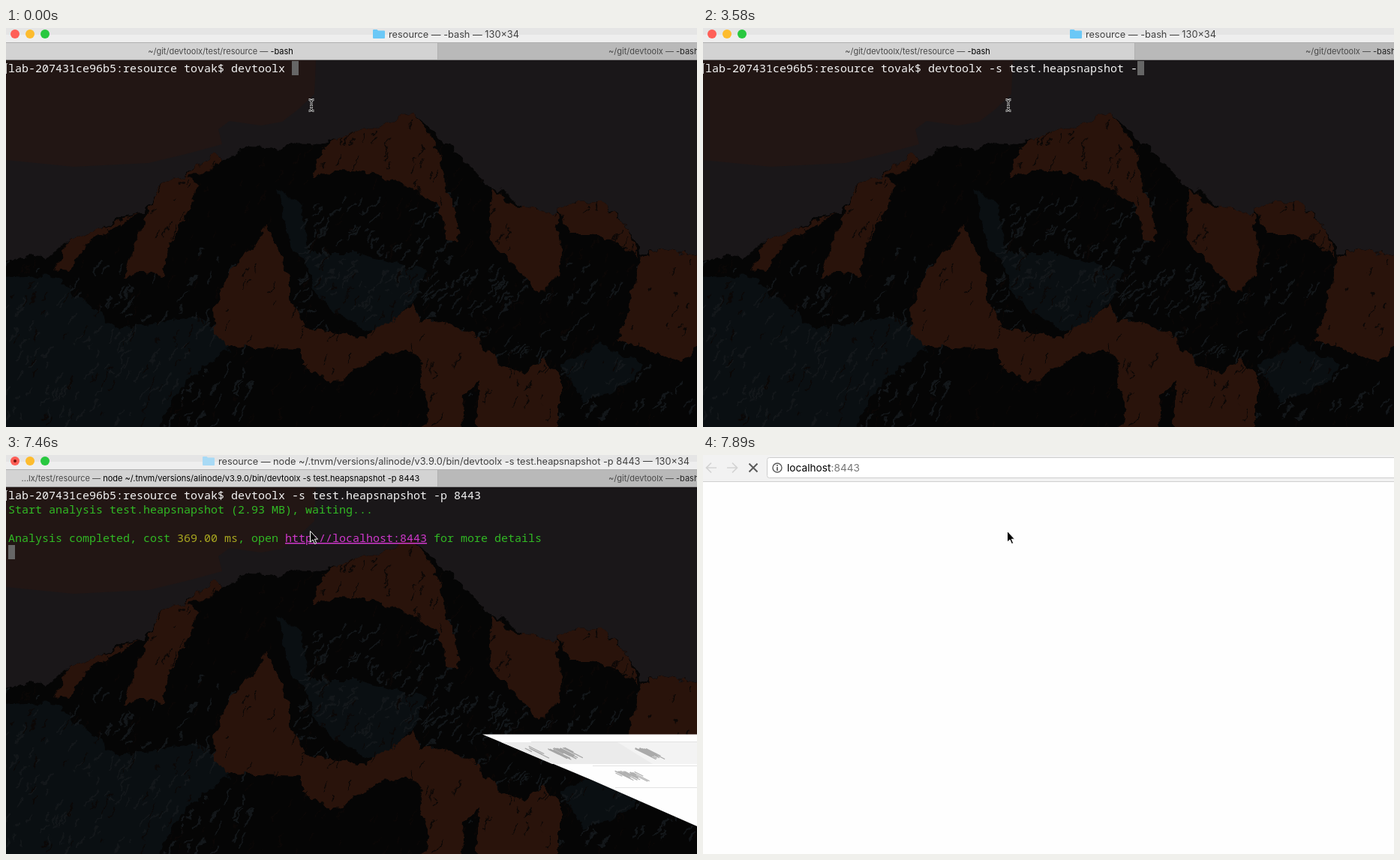
An HTML page for the animation above (8 s loop, 921 px wide and 532 px high).

```html
<!DOCTYPE html>
<html lang="en">
<head>
<meta charset="utf-8">
<title>Terminal session</title>
<style>
  html, body { margin: 0; width: 100%; height: 100%; overflow: hidden; background: #000; }
  svg { display: block; width: 921px; height: 532px; }
  text { white-space: pre; font-family: Inter, sans-serif; }
  .mono text { font: 500 15px "Noto Sans Mono", monospace; fill: #f4f4f4; }
  .mono .green { fill: #31b924; }
  .yellow { fill: #aaa820; }
  .link { fill: #d038cc; text-decoration: underline; }
  .tab { font-size: 11px; fill: #484848; }
  .bold { fill: #000; }
</style>
</head>
<body>
<svg viewBox="0 0 921 532">
  <defs>
    <filter id="rough" filterUnits="userSpaceOnUse" x="0" y="0" width="921" height="532" color-interpolation-filters="sRGB">
      <feTurbulence type="fractalNoise" baseFrequency=".07" numOctaves="3" seed="4"/>
      <feDisplacementMap in="SourceGraphic" scale="15" xChannelSelector="R" yChannelSelector="G"/>
    </filter>
    <path id="ridge" d="M-20 318L8 310 35 303 60 305 85 283 122 270 150 255 185 245 200 220 212 206 238 197 278 168 290 178 322 158 370 160 385 153 420 155 440 147 490 132 510 127 528 115 545 113 556 125 600 165 645 212 658 217 688 238 712 243 725 250 735 240 752 234 795 233 812 248 830 268 846 302 870 294 940 307V550H-20Z"/>
    <clipPath id="rock"><use href="#ridge"/></clipPath>
    <clipPath id="edge"><path id="edgePath"/></clipPath>
  </defs>

  <!-- wallpaper -->
  <rect width="921" height="532" fill="#1a1719"/>
  <path fill="#221614" d="M0 43H413L411 88 390 108 368 125 340 130 298 124 283 135 288 155 240 168 190 180 90 185 40 180 0 176Z"/>
  <g filter="url(#rough)">
    <use href="#ridge" fill="#050505"/>
    <g clip-path="url(#rock)">
      <g fill="#0a0f12">
        <path d="M400 300L470 300 560 325 545 365 490 408 450 388 410 350Z"/>
        <path d="M-20 335L60 330 150 400 260 385 300 425 240 470 190 550H-20Z"/>
        <path d="M360 215L395 235 405 320 380 290Z"/>
        <path d="M740 450L790 420 850 450 830 475 770 500Z"/>
      </g>
      <path id="snow" stroke="#13171a" stroke-width="2.4"/>
      <g fill="#29130b">
        <path d="M62 322L85 283 180 247 110 285 85 324Z"/>
        <path d="M160 330L172 285 200 220 212 204 240 195 253 208 250 235 220 285 208 330 190 325Z"/>
        <path d="M240 197L278 167 289 178 255 195Z"/>
        <path d="M406 200L425 160 440 146 490 131 528 114 545 112 580 170 585 215 598 240 604 285 590 282 575 240 550 217 520 205 480 192 440 190Z"/>
        <path d="M348 262L363 300 378 335 378 360 400 400 478 412 545 368 550 395 580 390 625 410 655 445 690 460 715 440 738 465V550H625L632 470 610 490 605 550H555L565 500 550 470 555 450 540 430 500 435 435 475 395 450 395 428 300 425 280 410 278 375 295 330 325 295Z"/>
        <path d="M650 215L672 235 735 245 740 300 735 330 710 355 690 330 650 290 645 250Z"/>
        <path d="M735 240L752 233 795 232 830 268 842 307 812 285 780 275 750 275Z"/>
        <path d="M846 305L870 294 940 307V410L900 445 815 415 830 375Z"/>
      </g>
      <path id="cracks" stroke="#0b0706" stroke-width="1.5"/>
    </g>
  </g>

  <!-- terminal window -->
  <rect width="921" height="20" fill="#eeeeee"/>
  <rect width="921" height="9" fill="#e5e5e5"/>
  <rect y="19" width="921" height="24" fill="#b9b9b9"/>
  <rect y="20" width="575" height="22" fill="#d3d3d3"/>
  <path d="M0 19.5H921M575.5 20V42" stroke="#b0b0b0"/>
  <path d="M0 42.5H921" stroke="#8f8f8f"/>
  <circle cx="12" cy="8" r="6" fill="#ff5f57"/>
  <circle id="busyDot" cx="12" cy="8" r="2" fill="#74110b"/>
  <circle cx="32" cy="8" r="6" fill="#fdbc2e"/>
  <circle cx="52" cy="8" r="6" fill="#28c83f"/>
  <path id="folder" d="M0 3Q0 2 1 2H5.500L7 3.500H15Q16 3.500 16 4.500V13Q16 14 15 14H1Q0 14 0 13Z"/>
  <text id="title" x="597" y="13" font-size="12.75" text-anchor="middle" fill="#404040"></text>
  <text class="tab" x="286" y="35" text-anchor="middle"><tspan id="tabPath"></tspan><tspan id="tabJob" class="bold"></tspan></text>
  <text class="tab" x="803" y="35">~/git/devtoolx — <tspan fill="#222">-bash</tspan></text>

  <g class="mono">
    <path d="M2 47.500H.5V61" stroke="#c8c8c8" fill="none"/>
    <text id="command" x="3" y="59"></text>
    <text id="start" class="green" x="3" y="78">Start analysis test.heapsnapshot (2.93 MB), waiting...</text>
    <text id="done" class="green" x="3" y="116">Analysis completed, cost <tspan class="yellow">369.00 ms</tspan>, open <tspan class="link">http://localhost:8443</tspan> for more details</text>
    <rect id="caret" width="9" height="19" fill="#666"/>
  </g>

  <!-- browser window sliding out of the dock -->
  <g id="sliver">
    <path d="M635 372.500H921V495L780 433Z" fill="#fefefe"/>
    <path d="M660 383H921V412H728Z" fill="#ebebeb"/>
    <path d="M815 383H921V412H862Z" fill="#f3f3f3"/>
    <path d="M700 382.500H921M782 414.500H921M812 443.500H921" stroke="#e2e2e2"/>
    <path id="smears" stroke="#333" stroke-opacity=".38" stroke-width="1.200"/>
  </g>
  <g id="browser" clip-path="url(#edge)">
    <g id="page">
      <rect x="-60" y="-30" width="1100" height="700" fill="#fefefe"/>
      <rect x="-60" y="-1" width="1100" height="36" fill="#f2f2f2"/>
      <path d="M66 -30H293V-2H66ZM534 -9H561V-7H534Z" fill="#ececec"/>
      <path d="M66 -9V-1.500H293L296 -9M526 -9L531 -1.500H1040M-60 35.500H1040" fill="none" stroke="#cfcfcf"/>
      <rect x="85.500" y="3.500" width="1000" height="27" rx="3" fill="#fff" stroke="#cdcdcd"/>
      <g fill="none" stroke-width="1.700">
        <path d="M18 17H5M11 10.500L4.500 17 11 23.500M32 17H45M39 10.500L45.500 17 39 23.500" stroke="#d3d3d3"/>
        <path d="M61.500 11.500L72.500 22.500M72.500 11.500L61.500 22.500" stroke="#5a5a5a" stroke-width="2"/>
        <path d="M99 16V21M99 13V14.700" stroke="#5a5a5a"/>
        <circle cx="99" cy="17" r="6" stroke="#5a5a5a" stroke-width="1.400"/>
      </g>
      <text x="112" y="22" font-size="13.700">localhost<tspan fill="#777">:8443</tspan></text>
    </g>
  </g>

  <!-- pointers -->
  <g id="beam" fill="none">
    <path id="beamShape" d="M403.500 95.500Q407 95.500 407 98.500V107.500Q407 110.500 403.500 110.500M410.500 95.500Q407 95.500 407 98.500M407 107.500Q407 110.500 410.500 110.500M405 104.500H409" stroke="#d0d0d0" stroke-width="2.800"/>
    <use href="#beamShape" style="stroke:#111"/>
    <path d="M403.500 95.500Q407 95.500 407 98.500V107.500Q407 110.500 403.500 110.500M410.500 95.500Q407 95.500 407 98.500M407 107.500Q407 110.500 410.500 110.500M405 104.500H409" stroke="#111"/>
  </g>
  <path id="arrow" d="M405.500 101.500V116L409 113 411.500 118.500 413.700 117.500 411.300 112.200H415.500Z" fill="#000" stroke="#fff"/>
</svg>
<script>
const el = id => document.getElementById(id);
const show = (id, on) => el(id).style.display = on ? "" : "none";
const setText = (id, s) => el(id).textContent = s;

let seed = 11;
const rand = () => (seed = seed * 16807 % 2147483647) / 2147483647;

// Slanted strokes scattered over a box
function streaks(count, x, y, w, h, length, lean) {
  let d = "";
  for (let i = 0; i < count; i++) {
    const run = length * (.4 + rand());
    d += `M${x + rand() * w} ${y + rand() * h}l${lean * run} ${run}`;
  }
  return d;
}
el("snow").setAttribute("d", streaks(170, 0, 290, 330, 240, 14, -.6) +
  streaks(130, 390, 220, 220, 180, 10, -1) + streaks(130, 600, 300, 320, 220, 14, -.8));
el("cracks").setAttribute("d", streaks(480, 0, 120, 921, 412, 12, -.45));
el("smears").setAttribute("d", streaks(22, 722, 390, 25, 3, 10, 2) +
  streaks(16, 838, 390, 16, 3, 10, 2) + streaks(20, 810, 421, 30, 4, 9, 2) +
  streaks(4, 690, 388, 14, 4, 9, 2));
el("beam").children[1].remove();

const prompt = "lab-207431ce96b5:resource tovak$ devtoolx ";
const keys = [[600, "-"], [750, "s"], [1190, " "], [1640, "t"], [2240, "e"],
  [2530, "st.heapsnapshot "], [3580, "-"], [3880, "p"], [4330, " "],
  [5080, "8"], [5520, "4"], [5820, "4"], [6120, "3"]];
const ENTER = 6860, RUN = 7010, DONE = 7310, SLIVER = 7460, SWEEP = 7600, SETTLE = 7750, OPEN = 7890;
const job = "node ~/.tnvm/versions/alinode/v3.9.0/bin/devtoolx -s test.heapsnapshot -p 8443";

// Left edge of the window and its shear while it unfolds
const poses = {
  [SWEEP]: ["M0 0Q12 30 45 62C95 112 165 152 238 196C340 250 450 300 560 345L921 488V0Z", "matrix(1 0 .35 1 11.5 7.5)"],
  [SETTLE]: ["M-5 0C2 100 50 400 85 532H921V0Z", "matrix(1 0 .05 1 .7 0)"],
  [OPEN]: ["M0 0H921V532H0Z", "matrix(1 0 0 1 0 0)"]
};

function draw() {
  const t = performance.now() % 8000;
  const running = t >= RUN, done = t >= DONE;

  const line = prompt + keys.filter(k => t >= k[0]).map(k => k[1]).join("");
  setText("command", line);
  const row = done ? 4 : running ? 3 : t >= ENTER ? 1 : 0;
  el("caret").setAttribute("x", 3 + (row ? 0 : line.length * 9));
  el("caret").setAttribute("y", 44 + row * 19);
  show("start", running);
  show("done", done);

  setText("title", `resource — ${running ? job : "-bash"} — 130×34`);
  setText("tabPath", running ? "...lx/test/resource — " : "~/git/devtoolx/test/resource — ");
  setText("tabJob", running ? job : "-bash");
  el("folder").setAttribute("transform", `translate(${running ? 262 : 489} 0)`);
  el("folder").setAttribute("fill", running ? "#a8daf5" : "#6bc8f6");
  show("busyDot", running);

  show("beam", !done);
  show("arrow", done);
  show("sliver", t >= SLIVER && t < SWEEP);
  show("browser", t >= SWEEP);
  const [edge, shear] = poses[t >= OPEN ? OPEN : t >= SETTLE ? SETTLE : SWEEP];
  el("edgePath").setAttribute("d", edge);
  el("page").setAttribute("transform", shear);
  requestAnimationFrame(draw);
}
draw();
</script>
</body>
</html>
```
